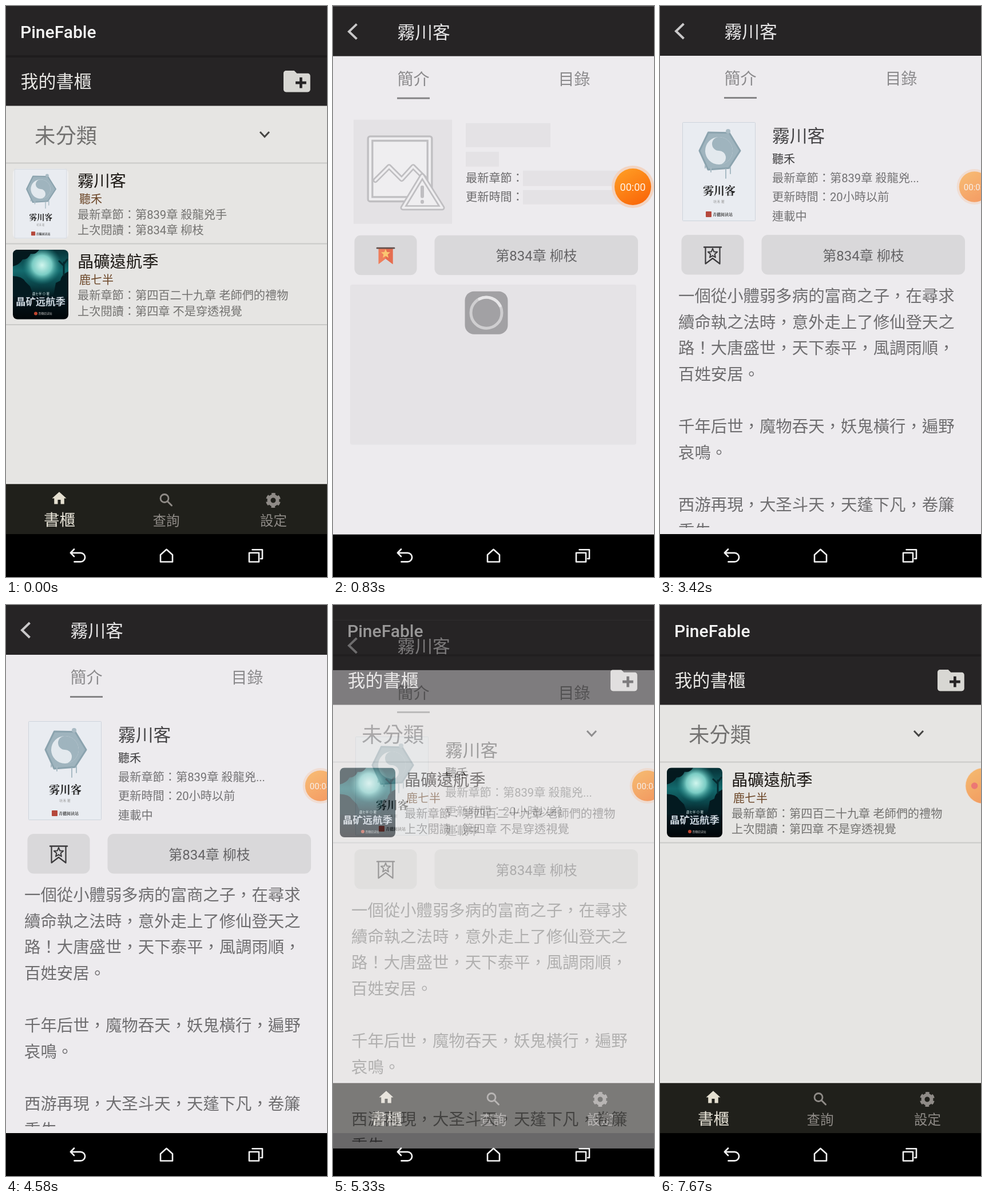
Animation, 561 px wide and 998 px high, one loop 8660 ms. Source, as an HTML page:

```html
<!DOCTYPE html>
<html lang="zh-Hant">
<head>
<meta charset="utf-8">
<title>Bookshelf</title>
<style>
  html, body { margin: 0; width: 100%; height: 100%; overflow: hidden; background: #000; }
  svg { display: block; }
  #stage { width: 100vw; height: 100vh; }
  text { font-family: Roboto, 'Noto Sans CJK TC', 'Noto Sans CJK', sans-serif; white-space: pre; }
  .serif { font-family: 'Noto Serif CJK SC', 'Noto Serif', serif; font-weight: 900; }
  .line { fill: none; stroke-linecap: round; stroke-linejoin: round; }
  .sharp { fill: none; }
</style>
</head>
<body>
<svg id="stage" viewBox="0 0 561 998"></svg>
<script>
const LOOP = 8660, STEP = 250 / 3;
const BOOK = '霧川客', WRITER = '聽禾', CHAPTER = '第834章 柳枝';

// Text is placed by the vertical centre of its glyphs.
const text = (x, cy, size, str, fill, attrs = '') =>
  `<text x="${x}" y="${cy + size * .38}" font-size="${size}" fill="${fill}" ${attrs}>${str}</text>`;
const mid = (x, cy, size, str, fill, attrs = '') => text(x, cy, size, str, fill, `text-anchor="middle" ${attrs}`);
const rect = (x, y, w, h, fill, r = 0, attrs = '') =>
  `<rect x="${x}" y="${y}" width="${w}" height="${h}" rx="${r}" fill="${fill}" ${attrs}/>`;
const line = (d, stroke, width, kind = 'line') =>
  `<path class="${kind}" d="${d}" stroke="${stroke}" stroke-width="${width}"/>`;
const circle = (x, y, r, fill, attrs = '') => `<circle cx="${x}" cy="${y}" r="${r}" fill="${fill}" ${attrs}/>`;
const polygon = (x, y, n, radius, turn = -Math.PI / 2) => 'M' + Array.from({ length: n }, (_, i) => {
  const a = turn + i * 2 * Math.PI / n, r = radius(i);
  return `${(x + r * Math.cos(a)).toFixed(2)} ${(y + r * Math.sin(a)).toFixed(2)}`;
}).join('L') + 'Z';

const defs = `<defs>
  <linearGradient id="orange" x1="0" y1="0" x2=".6" y2="1">
    <stop stop-color="#ffa126"/><stop offset="1" stop-color="#fa6a0a"/></linearGradient>
  <linearGradient id="night" x1="0" y1="0" x2="0" y2="1">
    <stop stop-color="#063036"/><stop offset=".3" stop-color="#136a6d"/><stop offset=".5" stop-color="#0a4449"/>
    <stop offset=".68" stop-color="#04161c"/><stop offset="1" stop-color="#010508"/></linearGradient>
  <radialGradient id="moon"><stop stop-color="#d0f6ee"/><stop offset=".5" stop-color="#7accc4"/>
    <stop offset="1" stop-color="#1f8886" stop-opacity="0"/></radialGradient>
  <clipPath id="nightClip"><rect width="97" height="121.5" rx="8"/></clipPath>
  <clipPath id="blurbClip"><rect y="480" width="561" height="432"/></clipPath>
</defs>`;

const paleCover = rect(.5, .5, 127, 172, '#e9ecf1', 1, 'stroke="#ced4dc"')
  + `<path d="${polygon(64, 50, 6, i => [37, 35, 38, 34, 37, 36][i], 0)}" fill="#9fb4be" stroke="#8ba3ae" stroke-width="3" stroke-linejoin="round"/>`
  + circle(80, 16, 4, '#a9bbc4')
  + line('M76 82V98M50 80V87M84 79V90M40 76V80', '#a9bbc4', 2)
  + circle(64, 50, 24, '#e3e9ee')
  + '<path d="M64 26A24 24 0 0 1 64 74A12 12 0 0 0 64 50A12 12 0 0 1 64 26Z" fill="#9fb4be"/>'
  + circle(63, 38, 4, '#9fb4be') + circle(65, 62, 4, '#e3e9ee')
  + mid(64.5, 120, 19, '雾川客', '#222', 'class="serif"')
  + mid(64, 139, 6, '听禾 著', '#999')
  + rect(41, 156, 10, 10, '#b5483c', 1)
  + text(53, 161, 7, '青穗阅读站', '#333', 'class="serif"');

const nightCover = '<g clip-path="url(#nightClip)">' + rect(0, 0, 97, 122, 'url(#night)')
  + circle(51, 27, 34, 'url(#moon)')
  + '<path d="M0 0H46Q40 9 31 7Q27 17 17 17Q12 26 0 29Z" fill="#04191e"/>'
  + '<path d="M0 46Q16 46 22 56L30 64L36 80H0ZM97 38Q84 44 83 54L75 58L71 80H97Z" fill="#031a20"/>'
  + line('M89 44V22M89 28L81 20M89 25L95 17', '#05292f', 3)
  + mid(49, 77, 5.5, '鹿七半 ⊙ 著', '#dceeee')
  + mid(48.5, 90.5, 17.4, '晶矿远航季', '#e9eff2', 'font-weight="900" stroke="#46596a" stroke-width=".5"')
  + circle(40, 111.5, 3, '#c0452f') + text(44.5, 111.5, 4.8, '青穗阅读站', '#bbb') + '</g>';

const item = (id, top, cover, title, writer, latest, last) => `<g id="${id}"><g transform="translate(0 ${top})">`
  + cover + text(125, 31, 28.3, title, '#1c1814') + text(128, 63, 20, writer, '#6b4526')
  + text(125, 90, 20.2, '最新章節：' + latest, '#737270') + text(125, 117.5, 20.2, '上次閱讀：' + last, '#737270')
  + rect(0, 140.5, 561, 2, '#cacac8') + '</g></g>';

const systemBar = rect(0, 923, 561, 75, '#000')
  + line('M119 949.5L112.9 955.8L119 962.1M113.5 955.8H130.3A7.8 7.8 0 0 1 130.3 971.4H119.5', '#f2f2f2', 2.7)
  + line('M280.5 949.8L291 959.2V971.5H270V959.2Z', '#f2f2f2', 2.6)
  + line('M425 955.8H442V971.5H425ZM430.5 950.3H448V966H445', '#f2f2f2', 2.6);

const dim = '#8f8b87';
const shelf = rect(0, 0, 561, 923, '#e6e5e3') + rect(0, 0, 561, 174.5, '#262425') + rect(0, 86, 561, 4, '#1e1c1d')
  + text(25, 45, 30, 'PineFable', '#f4f4f4', 'font-weight="500"')
  + text(25.5, 131.5, 31, '我的書櫃', '#e8e7e4')
  + '<path transform="translate(480.3 103.7) scale(2.34)" fill="#d8d7d3" d="M20 6h-8l-2-2H4c-1.1 0-2 .9-2 2v12c0 1.1.9 2 2 2h16c1.1 0 2-.9 2-2V8c0-1.1-.9-2-2-2zm-1 8h-3v3h-2v-3h-3v-2h3V9h2v3h3z"/>'
  + text(50, 226, 36.4, '未分類', '#737271')
  + line('M444 220L452 228.5L460 220', '#454443', 3, 'sharp')
  + rect(0, 273.5, 561, 2, '#cacac8')
  + item('first', 274, rect(12, 10.5, 97, 122, '#efeff1', 8)
    + `<g transform="translate(14.7 11) scale(.715 .7)">${paleCover}</g>`,
    BOOK, WRITER, '第839章 殺龍兇手', CHAPTER)
  + item('second', 415.5, `<g transform="translate(12 10.5)">${nightCover}</g>`,
    '晶礦遠航季', '鹿七半', '第四百二十九章 老師們的禮物', '第四章 不是穿透視覺')
  + rect(0, 833.5, 561, 2, '#f1f0ee') + rect(0, 835.5, 561, 88, '#20201b')
  + '<path transform="translate(78 845.6) scale(1.25)" fill="#e4dfd0" d="M10 20v-6h4v6h5v-8h3L12 3 2 12h3v8z"/>'
  + mid(93.5, 898, 27.5, '書櫃', '#e8e4d8')
  + circle(277, 860.5, 7, 'none', `stroke="${dim}" stroke-width="2.8"`) + line('M283 866.5L289.5 873', dim, 3)
  + mid(280, 899, 23.5, '查詢', dim)
  + circle(467, 864, 7.5, 'none', `stroke="${dim}" stroke-width="6"`)
  + circle(467, 864, 11, 'none', `stroke="${dim}" stroke-width="4" stroke-dasharray="6.4 5.12" transform="rotate(13.5 467 864)"`)
  + mid(467.5, 899, 23.5, '設定', dim);

const blurb = ['一個從小體弱多病的富商之子，在尋求', '續命執之法時，意外走上了修仙登天之', '路！大唐盛世，天下泰平，風調雨順，',
  '百姓安居。', '', '千年后世，魔物吞天，妖鬼橫行，遍野', '哀鳴。', '', '西游再現，大圣斗天，天蓬下凡，卷簾', '重生'];
const flag = 'M79.5 422V450.5L92 441L104.5 450.5V422';
const star = polygon(92, 432.5, 10, i => i % 2 ? 3.8 : 8.5);
const grey = '#e4e2e5', frameGrey = '#bfbec1', paper = '#efeef0';
const outline = (d, width) => line(d, frameGrey, width) + line(d, paper, width * .4);

const loading = `<g id="loading">` + rect(36, 198, 172, 182, grey)
  + rect(66, 232, 102, 104, paper)
  + outline('M65 231H169V337H65Z', 11)
  + outline('M74 304L98 280L120 302L140 280L160 300', 9)
  + `<path d="M156 296L191 352H122Z" fill="${paper}"/>`
  + outline('M156 296L191 352H122Z', 9)
  + line('M156 316V332M156 341V342', frameGrey, 6)
  + rect(232, 204, 148, 42, grey) + rect(232, 254, 58, 26, grey)
  + rect(332, 287, 198, 27, grey) + rect(332, 321, 193, 25, grey)
  + rect(30, 486, 500, 280, '#e5e3e6', 4)
  + '<g class="widgets">' + text(232, 300, 20.2, '最新章節：', '#6c6b6d') + text(232, 333, 20.2, '更新時間：', '#6c6b6d')
  + rect(230.5, 498, 75, 75, '#a2a1a4', 16)
  + circle(268, 535.5, 27, 'none', 'stroke="#cfced0" stroke-width="5"')
  + `<g id="spinner">${line('M268 508.5A27 27 0 0 1 295 535.5', '#e6e5e7', 5)}</g></g></g>`;

const loaded = `<g id="loaded">` + `<g id="cover" transform="translate(39 203)">${paleCover}</g>`
  + text(196, 226.5, 30.7, BOOK, '#454446') + text(196, 267, 20, WRITER, '#3d3c3e')
  + ['最新章節：第839章 殺龍兇...', '更新時間：20小時以前', '連載中']
    .map((s, i) => text(196, 300 + i * 33.5, 20.2, s, '#737274')).join('')
  + '<g clip-path="url(#blurbClip)">'
  + blurb.map((s, i) => text(32, 506.5 + i * 45.6, 28.4, s, '#6f6e70')).join('') + '</g></g>';

const buttons = '<g class="widgets">'
  + rect(37.5, 400, 109, 69.5, '#d9d8da', 11) + rect(177.5, 400, 355.5, 69.5, '#d9d8da', 11)
  + mid(355.5, 435.5, 24, CHAPTER, '#656466')
  + `<g id="marked"><path d="${flag}Z" fill="#ef7f5c"/><path d="M92 422H104.5V450.5L92 441Z" fill="#e56d50"/>
     ${line('M77 422.5H107', '#63504c', 2.6)}<path d="${star}" fill="#fbc671"/></g>`
  + `<g id="unmarked">${line('M77 421.5H107', '#3b3a3c', 2.4)}${line(flag, '#3b3a3c', 2.2)}${line(star, '#3b3a3c', 2)}</g></g>`;

const detail = `<g id="detail">` + rect(0, 0, 561, 923, '#edebee') + rect(0, 0, 561, 87, '#262425')
  + line('M41.5 31L28 44L41.5 57', '#c9c8c9', 4, 'sharp')
  + text(112.5, 44.5, 30.8, BOOK, '#e6e5e6')
  + mid(140.5, 126.5, 28, '簡介', '#8b8a8c') + mid(421.5, 126.5, 28, '目錄', '#8b8a8c')
  + rect(112, 159, 57, 3, '#858486')
  + loading + loaded + buttons + '</g>';

const bubble = `<g id="bubble"><circle id="halo" r="37" fill="#f4d0bb" opacity=".85"/>
  <circle r="32" fill="url(#orange)"/>${mid(0, .5, 18, '00:00', '#fff4e8', 'id="clock"')}
  <circle id="dot" cx="-16" r="6" fill="#f0302c"/></g>`;

document.getElementById('stage').innerHTML = defs + shelf + systemBar + detail + bubble;

const el = id => document.getElementById(id);
const show = (id, on) => el(id).setAttribute('display', on ? 'inline' : 'none');
const set = (id, name, value) => el(id).setAttribute(name, value);
const ramp = (t, from, to) => Math.min(1, Math.max(0, (t - from) / (to - from)));
const widgets = document.querySelectorAll('.widgets');

function drawDetail(t) {
  const rise = 80 * (1 - ramp(t, 264, 978)) ** 3;
  const fall = 80 * ramp(t, 5083, 5443) ** 3;
  set('detail', 'transform', `translate(0 ${(rise + fall).toFixed(2)})`);
  set('detail', 'opacity', ramp(t, 285, 554) * (1 - ramp(t, 5200, 5440)));
  show('detail', t > 300 && t < 5440);
  show('loading', t < 1240);
  show('loaded', t >= 1240);
  set('cover', 'opacity', ramp(t, 1170, 1580));
  set('spinner', 'transform', `rotate(${t * .4} 268 535.5)`);
  widgets.forEach(w => w.setAttribute('opacity', ramp(t, 285, 675)));
  show('marked', t < 2740);
  show('unmarked', t >= 2740);
}

function drawShelf(t) {
  const removed = t > 4800;
  show('first', !removed);
  set('second', 'transform', `translate(0 ${removed ? -141.5 : 0})`);
}

function drawBubble(t) {
  const docked = t > 5740, slide = 1 - (1 - ramp(t, 1700, 2080)) ** 2;
  const x = docked ? 565 : 524 + 25.5 * slide;
  const scale = docked ? .96 : 1 - .165 * slide;
  set('bubble', 'transform', `translate(${x} 316) scale(${scale})`);
  set('bubble', 'opacity', ramp(t, 0, 160) * (1 - .4 * ramp(t, 2083, 2245)));
  set('halo', 'r', docked ? 33 : 37);
  const seconds = [1240, 2160, 3410, 4575].filter(s => t >= s).length;
  el('clock').textContent = '00:0' + seconds;
  show('clock', !docked);
  show('dot', docked);
}

function frame(now) {
  const t = Math.floor(now % LOOP / STEP + .05) * STEP;
  drawShelf(t);
  drawDetail(t);
  drawBubble(t);
  requestAnimationFrame(frame);
}
frame(0);
</script>
</body>
</html>
```
